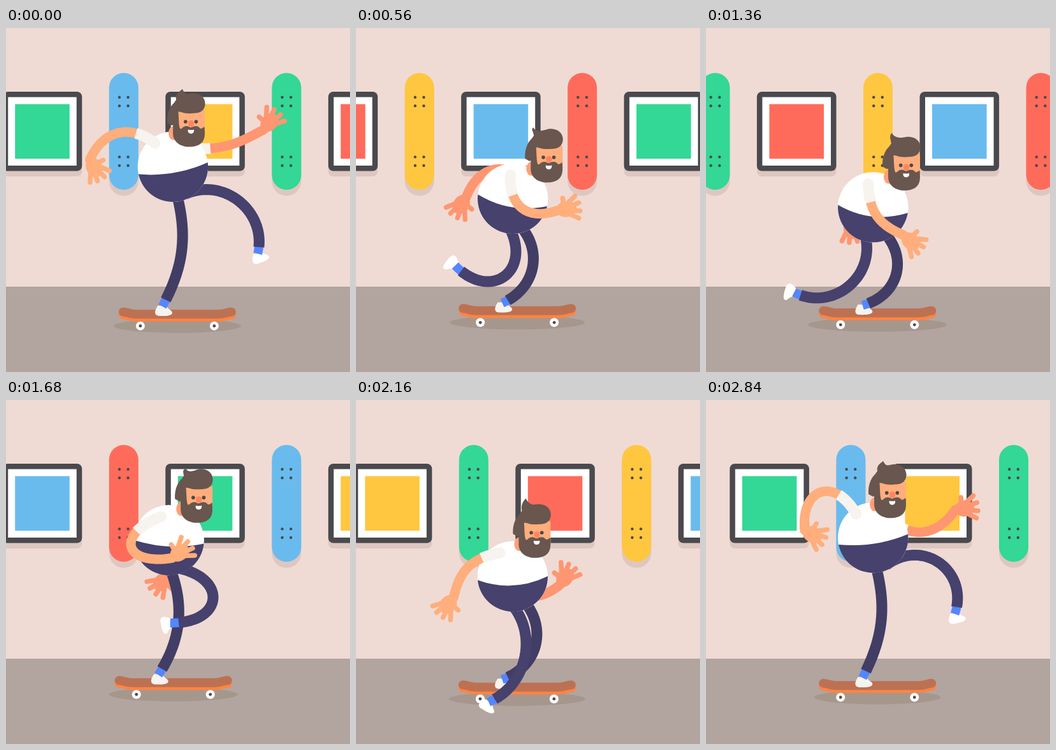
An HTML page with a canvas for the animation above (2.88 s loop, 540x540 px).

```html
<!DOCTYPE html>
<html lang="en">
<head>
<meta charset="utf-8">
<title>Skater in the gallery</title>
<style>
html, body { margin: 0; height: 100%; overflow: hidden; background: #efdbd4; }
canvas { display: block; width: 100vw; height: 100vh; }
</style>
</head>
<body>
<canvas id="stage" width="540" height="540"></canvas>
<script>
const g = document.getElementById('stage').getContext('2d');
const LOOP = 2880, PUSH = LOOP / 3, SWAY = LOOP / 2, STEP = 40;
const TAU = 2 * Math.PI, DEG = Math.PI / 180;
const GREEN = '#33d796', BLUE = '#69bbee', YELLOW = '#ffc740', RED = '#ff6b5b';
const DARK = '#4a494e', WALL_SHADE = '#dec7c0', HAIR = '#68564f', NAVY = '#46416d', NAVY_BACK = '#413d65',
  SKIN = '#ffae7c', SKIN_BACK = '#ff9672', CREAM = '#f7f3ef', SOCK = '#5486ff';
const WALL = [GREEN, BLUE, YELLOW, GREEN, RED, YELLOW, BLUE, RED];
const GAP = 127.8;

function fill(color, path) { g.fillStyle = color; g.fill(path); }
function box(color, x, y, w, h, r = 0) {
  g.fillStyle = color; g.beginPath(); g.roundRect(x, y, w, h, r); g.fill();
}
function oval(color, x, y, rx, ry = rx) {
  g.fillStyle = color; g.beginPath(); g.ellipse(x, y, rx, ry, 0, 0, TAU); g.fill();
}
function line(color, width, points, cap = 'butt') {
  g.strokeStyle = color; g.lineWidth = width; g.lineCap = cap; g.lineJoin = 'round';
  g.beginPath(); points.forEach(([x, y]) => g.lineTo(x, y)); g.stroke();
}
function placed(x, y, degrees, draw) {
  g.save(); g.translate(x, y); g.rotate(degrees * DEG); draw(); g.restore();
}

function wall(t) {
  const shift = t / STEP * GAP / 3, first = Math.floor((shift - 120) / GAP);
  for (let k = first; k < first + 7; k++) {
    const color = WALL[(k + 8) % 8];
    placed(57 + k * GAP - shift, 0, 0, () => {
      if (k % 2) {
        box(WALL_SHADE, -23, 80, 46, 183.5, 23);
        box(color, -23, 70.5, 46, 183.5, 23);
        for (const y of [108.8, 122.3, 202.4, 216]) for (const x of [-6.8, 6.8]) oval(DARK, x, y, 2.2);
      } else {
        box(WALL_SHADE, -62.3, 112, 124.6, 121, 8);
        box(DARK, -62.3, 100, 124.6, 124.6, 8);
        box('#fff', -53.8, 108.5, 107.6, 107.6);
        box(color, -42.8, 119.6, 85.6, 85.6);
      }
    });
  }
}

const DECK = new Path2D('M-85-22C-78-22-76-18.5-65-18.5H65C76-18.5 78-22 85-22');
function board(y) {
  placed(0, y, 0, () => {
    g.lineCap = 'round';
    g.lineWidth = 14;
    placed(0, 4.5, 0, () => { g.strokeStyle = '#ff8442'; g.stroke(DECK); });
    g.strokeStyle = '#bd7153';
    g.stroke(DECK);
    for (const x of [-58, 58]) { oval('#fff', x, 0, 7); oval(DARK, x, 0, 2.4); }
  });
}

// A limb of steady length bulges sideways more as its ends come closer.
// Returns a function giving the points between two fractions of the limb.
function hose([ax, ay], [bx, by], length, bend) {
  const dx = bx - ax, dy = by - ay, d = Math.hypot(dx, dy);
  const h = bend * Math.sqrt(Math.max(0, length * length - d * d));
  const inset = .5 - Math.abs(h) / 200;
  const control = u => [ax + dx * u + dy / d * h, ay + dy * u - dx / d * h];
  const ends = [[ax, ay], control(inset), control(1 - inset), [bx, by]];
  return (from = 0, to = 1) => Array.from({ length: 33 }, (_, i) => {
    const u = from + (to - from) * i / 32, w = 1 - u;
    const weights = [w * w * w, 3 * w * w * u, 3 * w * u * u, u * u * u];
    return [0, 1].map(k => weights.reduce((sum, weight, j) => sum + weight * ends[j][k], 0));
  });
}

function hand(color, [x, y], angle) {
  placed(x, y, angle, () => {
    oval(color, 14, 0, 16, 12.5);
    for (const a of [-31, -11, 10, 29]) {
      line(color, 7.5, [[14, a / 5], [35.5 * Math.cos(a * DEG), 35.5 * Math.sin(a * DEG)]], 'round');
    }
    line(color, 7.5, [[10, -4], [11, -18]], 'round');
  });
}

function arm(color, shoulder, wrist, angle, length, bend) {
  const points = hose(shoulder, wrist, length, bend);
  line(color, 15, points(), 'round');
  hand(color, wrist, angle);
  oval(CREAM, ...shoulder, 8.5);
  line(CREAM, 17, points(0, .25));
}

const SHOE = new Path2D('M-7-1H7C9 5 17 5 16 10C15 14 4 15-4 15C-13 15-12 7-7-1Z');
function leg(color, shoeColor, hip, foot, toe, length, bend) {
  const points = hose(hip, foot, length, bend);
  placed(...foot, toe, () => fill(shoeColor, SHOE));
  line(SOCK, 14, points(.9, 1));
  line(color, 17, points(0, .945));
}

function body(y, angle, dip) {
  placed(-7, y, angle, () => {
    oval('#fff', 0, 0, 55.2);
    g.fillStyle = NAVY;
    g.beginPath();
    g.arc(0, 0, 55.2, .05, Math.PI - .05);
    g.quadraticCurveTo(0, 2.5 + 2 * dip, 55.2, 2.5);
    g.fill();
  });
}

const NAPE = new Path2D('M-20-34C-32-28-38-14-37 2L-30 6L-18 0V-34Z');
const BEARD = new Path2D('M-28-22H-21C-18-12-20 2-17 11C-13 12-13 7-7 7C-3 7-2 9 0 9C2 9 4 7 8 7C14 7 14 13 18 10L21.5 8C22 17 23 26 18 32C13 38 5 39.5-3 39.5C-16 39.5-28 32-28 18Z');
const SMILE = new Path2D('M-4.5 12.5Q0 13.5 5 12.5V14C5 20.5-4.5 20.5-4.5 14Z');
function head(x, y, tuftX, tuftY) {
  placed(x, y, 0, () => {
    oval('#ffa077', -27, 18, 8, 11);
    fill(HAIR, NAPE);
    box(SKIN, -24, -19, 46, 42, 4);
    fill(HAIR, BEARD);
    fill('#fff', SMILE);
    oval('#ff8560', .5, 3, 4.8, 5);
    for (const side of [-8.3, 8.3]) oval(DARK, side, 0, 2.8);
    fill(HAIR, new Path2D(`M-27-16C-22-15-19-16-15-15C-8-12 4-13 8-13.5
      C18-14 22.5-21 22.5-28.5C22-42 9-46 0-44.5C-6-43 ${tuftX + 4} ${tuftY + 9} ${tuftX} ${tuftY}
      C${tuftX - 4} ${tuftY + 4}-25-44-23-34C-27-30-28-24-27-16Z`));
  });
}

// Everything below follows the phase of one push; x is measured from the middle of the board.
function skater(p) {
  const turn = peak => Math.cos(TAU * (p - peak));
  const wave = (mean, size, peak, size2 = 0, peak2 = 0) =>
    mean + size * turn(peak) + size2 * Math.cos(2 * TAU * (p - peak2));

  const lean = turn(.55);
  const crouch = Math.tanh(1.8 * turn(.39)) / Math.tanh(1.8);
  const bodyY = 248.5 + 33 * crouch;
  const boardY = wave(465.7, 4, .17);

  const backWrist = [wave(30, 112, .054), wave(250, 58, .48, 37, .287)];
  const frontWrist = [wave(-42, 115, .57, 18, -.085), wave(268, 59, .412, 12, .282)];
  const kickFoot = [wave(-12, 127, -.025, 15, .044), wave(391, 64, .289, 24, .21)];
  const standFoot = [-23.5, boardY - 30.5];

  oval('#a6978d', 0, boardY, wave(104, 5, .4), 11);
  arm(SKIN_BACK, [17, bodyY - 28], backWrist, wave(35, 126, .638, 32, .363), 125, -.55);
  board(boardY);
  leg(NAVY_BACK, CREAM, [wave(0, 9, .3), bodyY + 36], standFoot, 3, 203, .32);
  leg(NAVY, '#fff', [wave(-3, 17, -.06), bodyY + 43], kickFoot, 58 + 78 * lean, 190, .5);
  body(bodyY, 10 * lean, 9.5 + 2.5 * crouch);
  head(35 + 14.5 * lean, bodyY - 67.8 + 3 * lean, -18.5 - 5.5 * lean, wave(-50, 4, .7));
  arm(SKIN, [-23 + 12.5 * lean, bodyY - 37], frontWrist, wave(41, 86, .203, 19, .149), 118, -wave(.6, .25, .86));
}

function draw(now) {
  const t = Math.floor(now / STEP) * STEP % LOOP;
  box('#efdbd4', 0, 0, 540, 540);
  wall(t);
  box('#b2a49f', 0, 406, 540, 134);
  placed(260.9 + 8.4 * Math.cos(TAU * (t + 70) / SWAY), 0, 0, () => skater(t % PUSH / PUSH));
  requestAnimationFrame(draw);
}
draw(0);
</script>
</body>
</html>
```
